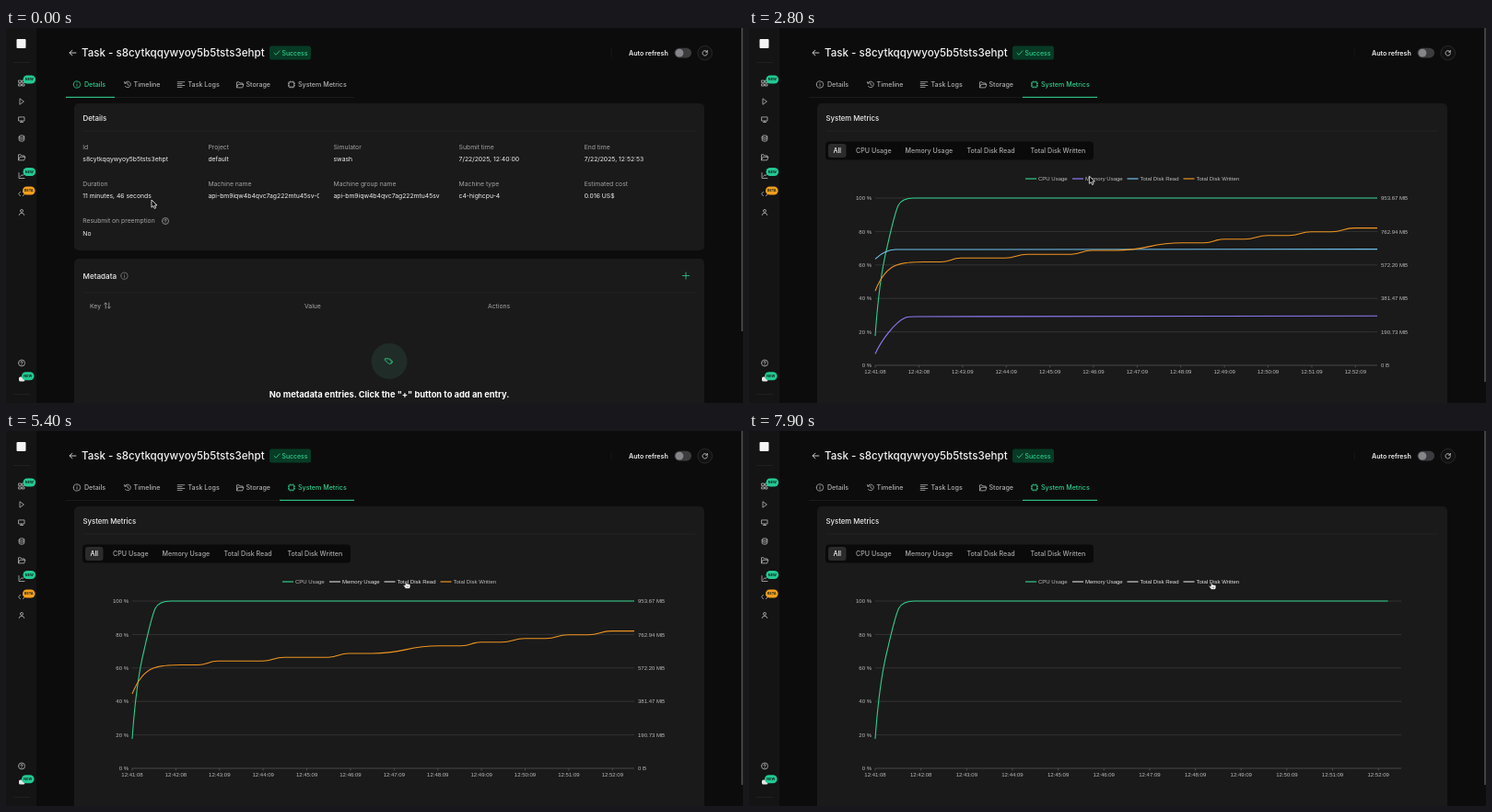
An HTML page that plays this animation: 800 by 408 pixels, repeating every 8000 ms.

```html
<!DOCTYPE html>
<html lang="en">
<head>
<meta charset="utf-8">
<title>Task metrics</title>
<style>
html, body { margin: 0; width: 100%; height: 100%; overflow: hidden; background: #0c0c0c; }
svg { display: block; width: 100%; height: 100%; }
text { font: 500 7.1px Inter, "Open Sans", sans-serif; fill: currentColor; white-space: pre; }
.chart text { font: 6px "Liberation Sans", Arial, sans-serif; }
.ico { fill: none; stroke: currentColor; stroke-width: .8; stroke-linecap: round; stroke-linejoin: round; }
.line { fill: none; stroke-width: 1.1; stroke-linejoin: round; vector-effect: non-scaling-stroke; }
</style>
</head>
<body>
<svg id="stage" viewBox="0 0 800 408" preserveAspectRatio="none">
  <defs>
    <clipPath id="reveal"><rect id="wipe" x="136" y="176" width="0" height="196"/></clipPath>
    <clipPath id="cell"><rect x="219" y="174" width="121" height="18"/></clipPath>
  </defs>
  <rect width="800" height="408" fill="#0c0c0c"/>
  <g id="side"></g>
  <g id="head"></g>
  <g id="tabs"></g>
  <g id="details"></g>
  <g id="metrics" class="chart"></g>
  <rect id="thumb" x="798" width="2" height="385" fill="#414141"/>
  <g id="arrow">
    <path d="M0 0V8.2L1.9 6.5L3.2 9.4L4.7 8.7L3.4 5.9H6Z" fill="#000" stroke="#fff" stroke-width=".8" stroke-linejoin="round"/>
  </g>
  <g id="hand">
    <path d="M-.8 .6Q0 -.5 .8 .6V3.2Q1.8 2.6 2.3 3.4Q3.3 2.9 3.8 3.8Q5 3.5 5 4.8Q5.2 7 4 8.6H-.2Q-1.4 6.6 -2.8 5.2Q-2.6 3.9 -.8 5.1Z" fill="#fff" stroke="#111" stroke-width=".7" stroke-linejoin="round"/>
    <path d="M1 5.4V7.2M2.5 5.4V7.2" stroke="#111" stroke-width=".45"/>
  </g>
</svg>
<script>
const $ = id => document.getElementById(id);
const NS = 'http://www.w3.org/2000/svg';
const GREEN = '#2fce8b', PURPLE = '#8c7cf5', BLUE = '#6fc3f0', ORANGE = '#ef9420';

function add(parent, tag, attrs = {}, body) {
  const el = document.createElementNS(NS, tag);
  for (const k in attrs) el.setAttribute(k, attrs[k]);
  if (body !== undefined) el.textContent = body;
  return parent.appendChild(el);
}
const label = (p, x, y, s, color, style = '', anchor = 'start') =>
  add(p, 'text', { x, y, fill: color, 'text-anchor': anchor, style: `fill:${color};${style}` }, s);
const box = (p, x, y, width, height, fill, rx = 0, more = {}) =>
  add(p, 'rect', { x, y, width, height, fill, rx, ...more });
const icon = (p, x, y, d, color) =>
  add(p, 'path', { class: 'ico', d, transform: `translate(${x} ${y})`, style: color ? `color:${color}` : '' });
const rule = (p, x1, y1, x2, y2, stroke, more = {}) =>
  add(p, 'line', { x1, y1, x2, y2, stroke, 'stroke-width': .7, ...more });
const show = (el, on) => { el.style.display = on ? '' : 'none'; };

const ring = r => `M${-r} 0A${r} ${r} 0 1 1 ${r} 0A${r} ${r} 0 1 1 ${-r} 0`;
const INFO = ring(3.7) + 'M0 -.3V1.7M0 -1.8V-1.7';
const HELP = ring(3.5) + 'M-1.1 -.8Q-.9 -1.9 0 -1.9Q1.2 -1.8 1.1 -.8Q.9 -.1 0 .3V.7M0 1.8V1.9';
const FOLDER = 'M-3.5 3V-2.7H-1L0 -1.5H3V-.2M-3.5 3L-2 -.2H4L2.8 3Z';
const DISK = 'M-2.8 -2A2.8 1.2 0 1 1 2.8 -2A2.8 1.2 0 1 1 -2.8 -2V2A2.8 1.2 0 0 0 2.8 2V-2M-2.8 0A2.8 1.2 0 0 0 2.8 0';

// sidebar
const side = $('side');
box(side, 0, 0, 33, 408, '#141414');
box(side, 11.5, 12, 10, 10, '#f4f4f4', 1);
rule(side, 8, 37.5, 26, 37.5, '#262626');
rule(side, 8, 398.5, 26, 398.5, '#262626');
[
  [60, 'M-3 -3H-.6V-.6H-3ZM.9 -3H3V-.6H.9ZM-3 .9H-.6V3H-3ZM.9 .9H3V3H.9Z'],
  [80, 'M-1.7 -3L2.4 0L-1.7 3Z'],
  [99.5, 'M-3 -2.6H3V1.5H-3ZM0 1.5V3M-1.5 3H1.5'],
  [120, DISK],
  [140.5, FOLDER],
  [160.5, 'M-3 -3V3H3M-1.5 1L0 -.8L1.2 .2L3 -2'],
  [180.5, 'M-1.5 -2.2L-3.4 0L-1.5 2.2M1.5 -2.2L3.4 0L1.5 2.2'],
  [200.5, 'M-1.5 -1.6A1.5 1.5 0 1 1 1.5 -1.6A1.5 1.5 0 1 1 -1.5 -1.6M-2.8 3Q-2.6 .8 0 .8Q2.6 .8 2.8 3'],
  [364.5, HELP]
].forEach(([y, d]) => icon(side, 17, y, d, '#b8b8b8'));
box(side, 14, 379.5, 6.4, 5, '#e6e6e6', 1.5);
[[25.3, 56, 'NEW'], [25.3, 156.5, 'NEW'], [24.8, 177, 'BETA'], [23.8, 378.8, 'NEW']].forEach(([x, y, s]) => {
  const beta = s === 'BETA';
  box(side, x - 6.8, y - 4.5, 13.6, 9, beta ? '#f59e1c' : '#22c993', 4.5);
  label(side, x, y + 1.3, s, '#10261c', 'font-size:3.7px;font-weight:700', 'middle');
});

// header
const head = $('head');
icon(head, 72.5, 27, 'M3.4 0H-3.4M-.6 -2.8L-3.4 0L-.6 2.8', '#f0f0f0');
label(head, 82, 31.3, 'Task - s8cytkqqywyoy5b5tsts3ehpt', '#f2f2f2', 'font-size:11.6px');
box(head, 286, 19.5, 45, 15, '#073b25', 2.5);
icon(head, 294, 27, 'M-3 .2L-1 2.2L3 -2.2', GREEN);
label(head, 299.5, 29.6, 'Success', GREEN, 'font-size:6.9px');
rule(head, 657, 22, 657, 32, '#1d1d1d');
label(head, 676, 29.7, 'Auto refresh', '#f0f0f0', 'font-weight:600');
box(head, 725.5, 21.8, 18.6, 10.6, '#3c3c3e', 5.3);
add(head, 'circle', { cx: 731, cy: 27.1, r: 4.4, fill: '#85858a' });
add(head, 'circle', { cx: 758.7, cy: 27.2, r: 7.8, fill: '#111', stroke: '#363636', 'stroke-width': .7 });
icon(head, 758.7, 27.2, 'M2.4 -1.2A2.7 2.7 0 1 0 2.7 .6M2.6 -2.8V-1H.9', '#d0d0d0');

// tab bar
const tabs = $('tabs');
rule(tabs, 65, 75.5, 378, 75.5, '#202020');
const tabEls = [
  [77, 85, 'Details', INFO],
  [132, 138.5, 'Timeline', 'M-3 -1.5A3.3 3.3 0 1 1 -2.6 2M-3.6 -3L-3 -1.2L-1.2 -1.6M0 -1.7V.2L1.4 1'],
  [190, 197.5, 'Task Logs', 'M-3.8 -2.8H3.8M-3.8 -.9H1M-3.8 1H3.8M-3.8 2.9H1'],
  [254, 260.5, 'Storage', FOLDER],
  [310, 317, 'System Metrics', 'M-2.7 -2.7H2.7V2.7H-2.7ZM-1.2 -3.6V-2.7M1.2 -3.6V-2.7M-1.2 3.6V2.7M1.2 3.6V2.7M-3.6 -1.2H-2.7M-3.6 1.2H-2.7M3.6 -1.2H2.7M3.6 1.2H2.7']
].map(([ix, x, s, d]) => {
  const g = add(tabs, 'g');
  icon(g, ix, 61.5, d);
  label(g, x, 64.1, s, 'currentColor');
  return g;
});
const underline = box(tabs, 65, 74.8, 53, 1.1, GREEN);

// details page
const det = $('details');
const HEADING = 'font-size:7.9px';
const CARD = '#1a1a1a';
box(det, 74, 82, 684, 160, CARD, 5);
box(det, 74, 251, 684, 170, CARD, 5);
label(det, 83.5, 100.8, 'Details', '#f0f0f0', HEADING);
rule(det, 83.5, 112, 748, 112, '#262626');
const col = i => 83.3 + i * 136.1;
[
  [0, 0, 'Id', 's8cytkqqywyoy5b5tsts3ehpt'], [1, 0, 'Project', 'default'], [2, 0, 'Simulator', 'swash'],
  [3, 0, 'Submit time', '7/22/2025, 12:40:00'], [4, 0, 'End time', '7/22/2025, 12:52:53'],
  [0, 1, 'Duration', '11 minutes, 46 seconds'], [1, 1, 'Machine name', 'api-bm9iqw4b4qvc7ag222mtu45sv-0'],
  [2, 1, 'Machine group name', 'api-bm9iqw4b4qvc7ag222mtu45sv'], [3, 1, 'Machine type', 'c4-highcpu-4'],
  [4, 1, 'Estimated cost', '0.016 US$'], [0, 2, 'Resubmit on preemption', 'No']
].forEach(([c, r, name, value]) => {
  const y = 131.6 + r * 40.4, style = 'font-size:6.8px;font-weight:400';
  label(det, col(c), y, name, '#a2a2a2', style);
  const v = label(det, col(c), y + 13.4, value, '#f0f0f0', style);
  if (name === 'Machine name') v.setAttribute('clip-path', 'url(#cell)');
});
icon(det, 173, 210, HELP, '#a0a0a0');
label(det, 83.5, 272.8, 'Metadata', '#f0f0f0', 'font-size:8.1px');
icon(det, 128.5, 269.7, INFO, '#7a7a7a');
icon(det, 738, 269.5, 'M-3.6 0H3.6M0 -3.6V3.6', GREEN);
rule(det, 83.5, 288, 748, 288, '#262626');
[[91, 'Key'], [324, 'Value'], [523, 'Actions']].forEach(([x, s]) =>
  label(det, x, 304.6, s, '#a8a8a8', 'font-size:6.8px;font-weight:400'));
icon(det, 110, 302, 'M-1.8 3V-3L-3.2 -1.5M-1.8 -3L-.6 -1.7M1.8 -3V3L.5 1.7M1.8 3L3.2 1.6', '#a8a8a8');
add(det, 'circle', { cx: 416, cy: 362.5, r: 19.5, fill: '#202c27' });
icon(det, 415.5, 362.3, 'M-3.8 -2.6H-.4L3.4 1L.8 3.4L-3.8 -.3ZM1 -2.6L4.3 .8L2.4 3.2M-2 -1.2V-1.1', GREEN);
label(det, 416, 402, 'No metadata entries. Click the "+" button to add an entry.', '#fff', 'font-size:9.3px;font-weight:700', 'middle');

// metrics page
const met = $('metrics');
const LEFT = 137, TOP = 185, BASE = 367, WIDE = 708, NARROW = 682;
const UI = 'font:500 7.1px Inter,sans-serif';
box(met, 74, 82, 684, 340, CARD, 5);
label(met, 83.5, 100.8, 'System Metrics', '#f0f0f0', 'font:500 7.75px Inter,sans-serif');
rule(met, 83.5, 112, 748, 112, '#262626');
box(met, 83, 123.5, 291, 20, '#0a0a0a', 4);
box(met, 86, 126, 19.5, 15, '#2b2b2b', 3);
[[91.4, 'All'], [116, 'CPU Usage'], [169.5, 'Memory Usage'], [236.5, 'Total Disk Read'], [305.5, 'Total Disk Written']]
  .forEach(([x, s], i) => label(met, x, 136, s, i ? '#a9a9a9' : '#f5f5f5', UI));

const axes = add(met, 'g'), rightAxis = add(met, 'g');
const hLines = [], xTicks = [];
for (let i = 0; i <= 5; i++) {
  const y = BASE - i * 36.4;
  hLines.push(rule(axes, LEFT, y, NARROW, y, i ? '#3d3d3d' : '#5c5c5c'));
  label(axes, 133, y + 2.1, i * 20 + ' %', '#bcbcbc', '', 'end');
  label(rightAxis, 686, y + 2.1, ['0 B', '190.73 MB', '381.47 MB', '572.20 MB', '762.94 MB', '953.67 MB'][i], '#bcbcbc');
}
for (let i = 0; i < 12; i++) {
  const g = add(axes, 'g');
  rule(g, 0, BASE, 0, BASE + 2.5, '#5c5c5c');
  label(g, 0, 376.2, `12:${41 + i}:0${i < 2 ? 8 : 9}`, '#bcbcbc', '', 'middle');
  xTicks.push(g);
}

// stepped climb: each step is a flat run followed by an S-shaped rise
function stairs(steps) {
  let y = 254.5, d = '';
  for (const [x0, x1, y1] of steps) {
    const m = (x0 + x1) / 2;
    d += `L${x0} ${y}C${m} ${y} ${m} ${y1} ${x1} ${y1}`;
    y = y1;
  }
  return d;
}
const written = 'M137 286C141 276 149 262 160 258C169 254.6 178 254.5 190 254.5' + stairs([
  [208, 230, 250.3], [278, 302, 246.2], [350, 372, 242], [398, 470, 233.8],
  [494, 516, 229.8], [538, 563, 225.8], [586, 610, 221.7], [632, 657, 217.6]
]) + 'H682';

const plot = add(met, 'g', { 'clip-path': 'url(#reveal)' });
const series = [
  ['CPU Usage', GREEN, 300, 'M137 335C140 292 145 258 150 238C154 220 158 202 162 193C165 187 170 185 179 185H682'],
  ['Memory Usage', PURPLE, 351, 'M137 354.5C143 341 158 320 170 315C174 313.8 178 314 184 314L682 313.3'],
  ['Total Disk Read', BLUE, 410.5, 'M137 251.3C143 245.5 150 241.2 159 241L682 240.6'],
  ['Total Disk Written', ORANGE, 471.5, written]
].map(([name, color, x, d]) => ({
  color,
  path: add(plot, 'path', { class: 'line', d, stroke: color }),
  key: rule(met, x, 164, x + 12, 164, color, { 'stroke-width': 1.2 }),
  text: label(met, x + 14, 166.1, name, '#bdbdbd')
}));

// axis pointer and tooltip
const pointer = add(met, 'g');
const PX = 374.4, DASH = { 'stroke-dasharray': '2 1.5' };
rule(pointer, PX, TOP, PX, BASE, '#a8a8a8', DASH);
const cross = rule(pointer, LEFT, 0, NARROW, 0, '#a8a8a8', DASH);
[[185, GREEN], [313.6, PURPLE], [240.8, BLUE], [241.9, ORANGE]].forEach(([cy, stroke]) =>
  add(pointer, 'circle', { cx: PX, cy, r: 1.5, fill: '#fff', stroke, 'stroke-width': .8 }));
function tag(p, x, y, w, s) {
  box(p, x, y, w, 11, '#5e6873', 1);
  return label(p, x + w / 2, y + 7.7, s, '#fff', '', 'middle');
}
tag(pointer, PX - 15, 368.5, 30, '12:46:09');
const yTags = add(pointer, 'g');
const pctText = tag(yTags, 114, -5.5, 21.5, '');
const byteText = tag(yTags, 684, -5.5, 47.5, '');
const tip = add(pointer, 'g');
box(tip, 0, 0, 112, 62, '#fff', 2);
const TIP = 'font-size:6.8px';
label(tip, 5, 12.8, '12:46:09', '#555', TIP);
[['CPU Usage', '100.00 %', GREEN], ['Memory Usage', '29.50 %', PURPLE],
 ['Total Disk Read', '662.44 MB', BLUE], ['Total Disk Written', '655.92 MB', ORANGE]].forEach(([k, v, c], i) => {
  const y = 23.2 + i * 10.3;
  add(tip, 'circle', { cx: 7.5, cy: y - 2.2, r: 1.4, fill: c });
  const t = label(tip, 12, y, '', '#555', TIP);
  add(t, 'tspan', { 'font-weight': 700 }, k + ':');
  add(t, 'tspan', {}, ' ' + v);
});

// time, x, y of the cursor tip
const moves = [
  [0, 158, 187], [350, 158, 187], [1150, 345, 70], [2450, 345, 70], [3050, 384, 216],
  [3500, 386, 211.4], [3850, 388, 167], [4050, 388, 163], [4450, 388, 163], [4950, 434, 163],
  [5800, 434, 163], [6500, 502, 164], [8000, 502, 164]
];
const OPEN = 1300, DRAW = 1340, HIDE = [Infinity, 4300, 5150, 7660];
const clamp = v => Math.max(0, Math.min(1, v));
const ease = p => p < .5 ? 4 * p ** 3 : 1 - (2 - 2 * p) ** 3 / 2;

function cursorAt(t) {
  const i = moves.findIndex(m => m[0] > t);
  const [t0, x0, y0] = moves[i - 1], [t1, x1, y1] = moves[i];
  const p = clamp((t - t0) / (t1 - t0)), e = p * p * (3 - 2 * p);
  return [x0 + (x1 - x0) * e, y0 + (y1 - y0) * e];
}

function render(t) {
  const open = t >= OPEN, wide = t >= HIDE[3];
  show(det, !open);
  show(met, open);
  $('thumb').setAttribute('height', open ? 385 : 330);
  tabEls.forEach((g, i) => { g.style.color = i === (open ? 4 : 0) ? GREEN : '#b0b0b0'; });
  underline.setAttribute('x', open ? 297 : 65);
  underline.setAttribute('width', open ? 81 : 53);

  const right = wide ? WIDE : NARROW;
  hLines.forEach(l => l.setAttribute('x2', right));
  xTicks.forEach((g, i) => g.setAttribute('transform', `translate(${LEFT + i * (right - LEFT) / 11.5} 0)`));
  show(rightAxis, !wide);
  $('wipe').setAttribute('width', 1 + (wide ? WIDE - LEFT : (NARROW - LEFT) * clamp((t - DRAW) / 1000)));
  series.forEach((s, i) => {
    const on = t < HIDE[i];
    show(s.path, on);
    s.key.setAttribute('stroke', on ? s.color : '#cfcfcf');
    s.text.style.fill = on ? '#bdbdbd' : '#e4e4e4';
  });
  const grow = 1 + (WIDE - NARROW) / (NARROW - LEFT) * ease(clamp((t - HIDE[3]) / 500));
  series[0].path.setAttribute('transform', `translate(${LEFT * (1 - grow)} 0) scale(${grow} 1)`);

  const [x, y] = cursorAt(t);
  const inPlot = open && y >= TOP && y <= BASE;
  show(pointer, inPlot);
  if (inPlot) {
    const share = (BASE - y - .1) / (BASE - TOP);
    cross.setAttribute('y1', y + .3);
    cross.setAttribute('y2', y + .3);
    yTags.setAttribute('transform', `translate(0 ${y + .3})`);
    pctText.textContent = (share * 100).toFixed(2);
    byteText.textContent = (share * 1e9).toLocaleString('en-US', { minimumFractionDigits: 2, maximumFractionDigits: 2 });
    tip.setAttribute('transform', `translate(${x + 3.3} ${y + 1.8})`);
  }
  const onTab = y < 78, onLegend = t > 3900 && y < 167;
  show($('hand'), onTab || onLegend);
  show($('arrow'), !onTab && !onLegend);
  for (const id of ['hand', 'arrow']) $(id).setAttribute('transform', `translate(${x} ${y})`);
}

function tick() {
  render(Math.floor(performance.now() % 8000 / 100) * 100);
  requestAnimationFrame(tick);
}
tick();
</script>
</body>
</html>
```
